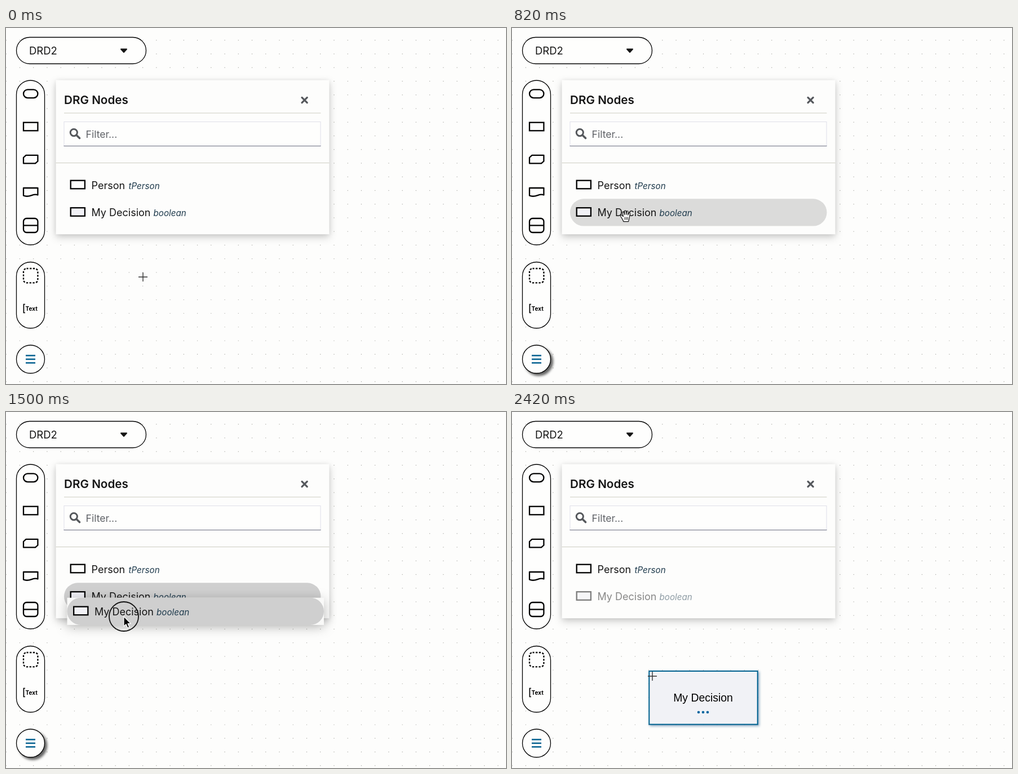
An HTML page for the animation above (2.44 s loop, 887 px wide and 632 px high).

```html
<!DOCTYPE html>
<html lang="en">
<head>
<meta charset="utf-8">
<title>Drag a node onto the diagram</title>
<style>
  html, body { margin: 0; width: 100%; height: 100%; overflow: hidden; background: #fdfdfc; }
  svg { display: block; width: 887px; height: 632px; font-family: Inter, "Open Sans", sans-serif; }
  .pill { fill: #fefefd; stroke: #000; stroke-width: 1.3; }
  .icon { fill: none; stroke: #000; stroke-width: 2.3; stroke-linejoin: round; }
  .label { font-size: 18px; fill: #151515; }
  .type { font-size: 15.2px; font-style: italic; fill: #1f3b4d; }
  .panel { fill: #fdfdfc; filter: drop-shadow(0 5px 7px #0003) drop-shadow(0 0 3px #0001); }
  .rule { stroke: #cdcdc1; stroke-width: 1.2; }
  .lifted { filter: drop-shadow(4px 4px 2px #0009); }
  #ghost { filter: drop-shadow(0 4px 10px #0004); }
  #node rect { fill: #f1f2f6; stroke: #006290; stroke-width: 2; filter: drop-shadow(2px 2px 2px #4a78a0a0); }
  #node text { font: 19.4px "Liberation Sans", Arial, sans-serif; text-anchor: middle; }
</style>
</head>
<body>
<svg viewBox="0 0 887 632">
  <defs>
    <g id="decision">
      <rect class="icon" x="114.7" y="319.2" width="25.2" height="14.6" style="fill:#f1f1f6;stroke-linejoin:miter"/>
      <text class="label" x="151.5" y="334.3">My Decision</text>
      <text class="type" x="261.5" y="334.3">boolean</text>
    </g>
  </defs>

  <path id="grid" stroke="#a8a8a2" stroke-width="1.4" stroke-linecap="round"/>

  <rect class="pill" x="18.5" y="16.5" width="230" height="47" rx="23.5"/>
  <text class="label" x="41" y="46.6" style="font-size:18.5px">DRD2</text>
  <path d="M204 37.5h10l-5 5.5z" stroke="#151515" stroke-width="2" stroke-linejoin="round" fill="#151515"/>

  <rect class="pill" x="18.5" y="93" width="50" height="292" rx="25"/>
  <g class="icon">
    <rect x="31" y="109.3" width="25.4" height="14.8" rx="7.4"/>
    <rect x="31" y="167.7" width="25.4" height="14.6" stroke-linejoin="miter"/>
    <path d="M35.5 225.8H56.4V236.5L52 240.4H31V230z"/>
    <path d="M31 284H56.4V296.5C48 292.5 42 302.5 31 297.5z"/>
    <rect x="31" y="338" width="25.4" height="25" rx="5.5"/>
    <path d="M31 350.5h25.4"/>
  </g>

  <rect class="pill" x="18.5" y="415.5" width="50" height="117.5" rx="25"/>
  <rect class="icon" x="31" y="427" width="25.4" height="25.4" rx="5.5" stroke-dasharray="3.3 2.46" stroke-dashoffset=".23"/>
  <path class="icon" d="M34 490.5h-2.6v15h2.6" style="stroke-width:1.7;stroke-linejoin:miter"/>
  <text x="34.6" y="502" font-size="10" font-weight="700">Text</text>

  <circle id="menu" class="pill" cx="43.5" cy="588" r="25"/>
  <path d="M35 581.4h17M35 588h17M35 594.6h17" stroke="#005f8f" stroke-width="2.5"/>

  <rect class="panel" x="88.5" y="92.5" width="485" height="273.7"/>
  <text x="103" y="135.2" font-size="20.7" font-weight="600" fill="#151515">DRG Nodes</text>
  <path d="M525 123.4l9.2 9.2m0-9.2l-9.2 9.2" stroke="#55585c" stroke-width="3.2" stroke-linecap="round"/>
  <path class="rule" d="M103 151h455.5M88.5 239.5h485"/>
  <rect x="103" y="166.5" width="455" height="43" fill="#fefefd" stroke="#dfdfe9"/>
  <path d="M102.5 209.5h456" stroke="#696c80" stroke-width="1.2"/>
  <g fill="none" stroke="#55585c" stroke-width="3">
    <circle cx="120.3" cy="185.6" r="6.1"/>
    <path d="M125 190.2l5.5 5.3" stroke-width="3.6" stroke-linecap="round"/>
  </g>
  <text x="141.5" y="194.6" font-size="17.6" fill="#606368">Filter...</text>

  <rect class="icon" x="114.7" y="270.7" width="25.2" height="14.6" style="stroke-linejoin:miter"/>
  <text class="label" x="151.5" y="285.8">Person</text>
  <text class="type" x="217.5" y="285.8">tPerson</text>
  <rect id="hover" x="103" y="303.3" width="455.5" height="48.3" rx="24.1"/>
  <use id="row" href="#decision"/>

  <g id="node">
    <rect x="243.3" y="460" width="192.4" height="94.6"/>
    <text x="339" y="513.7">My Decision</text>
    <g fill="#0066a0">
      <circle cx="331" cy="533" r="2.3"/><circle cx="339" cy="533" r="2.3"/><circle cx="347" cy="533" r="2.3"/>
    </g>
  </g>

  <g id="ghost">
    <rect x="103" y="303.3" width="455.5" height="48.3" fill="#f9f9f8"/>
    <rect x="103" y="303.3" width="455.5" height="48.3" rx="24.1" fill="#cfcfcf"/>
    <use href="#decision"/>
  </g>

  <g id="pointer">
    <circle id="ring" fill="none" stroke="#111" stroke-width="1.8"/>
    <path id="cross" d="M-8 0H8M0-8V8" stroke="#333" stroke-width="1.4"/>
    <path id="arrow" d="M0 0V17.5L4 13.8 6.8 20.3 9.7 19 7 12.7H12.3Z" fill="#000" stroke="#fff" stroke-width="1.2" stroke-linejoin="round"/>
    <g id="hand" stroke="#111" stroke-width="1.2" stroke-linejoin="round" stroke-linecap="round">
      <path fill="#fff" d="M-4 10C-5 6-8 3-9 .5-9.5-2-7.5-2.6-6-.5L-4.3 1-6-5.5C-6.3-7.8-4-8-3.4-6L-2.2-2V-8.2C-2.2-10.2.4-10.2.5-8.2L.8-2.2 1.8-7.8C2.2-9.6 4.4-9.2 4.2-7.2L3.8-1.6 5.4-5C6.2-6.6 8.2-5.8 7.6-4 7-1 6.6 4 4.8 10Z"/>
      <path fill="none" d="M-1.6 2.2V6.5M1 2.2V6.5M3.4 2.2V6.5" stroke-width="1"/>
    </g>
  </g>
</svg>
<script>
const LOOP = 2440, STEP = 20;
const PRESS = 1040, DRAG = 1340, RELEASE = 1840, DROP = 2000;
const GRAB = [202.3, 332.2], GHOST_LAG = 22;

// Pointer path: time, x, y
const path = [
  [0, 243, 442], [100, 241, 437], [250, 222, 388], [400, 207, 345], [540, 204, 336],
  [1060, 201, 333], [1300, 201.5, 335], [1500, 209, 363], [1740, 238, 445],
  [1800, 245, 461], [1920, 250, 468], [2020, 249, 469], [LOOP, 249, 469]
];

const el = id => document.getElementById(id);
const show = (id, on) => { el(id).style.display = on ? '' : 'none'; };
const slope = (i, k) => (path[i + 1][k] - path[i][k]) / (path[i + 1][0] - path[i][0]);

// Tangents that never overshoot the way points
function tangent(i, k) {
  if (i === 0 || i === path.length - 1) return 0;
  const a = slope(i - 1, k), b = slope(i, k);
  return a * b > 0 ? 2 * a * b / (a + b) : 0;
}

function pointerAt(time) {
  const t = Math.max(0, time);
  let i = 0;
  while (i < path.length - 2 && t >= path[i + 1][0]) i++;
  const span = path[i + 1][0] - path[i][0], u = (t - path[i][0]) / span, v = 1 - u;
  return [1, 2].map(k =>
    v * v * (1 + 2 * u) * path[i][k] + u * u * (3 - 2 * u) * path[i + 1][k] +
    span * u * v * (v * tangent(i, k) - u * tangent(i + 1, k)));
}

function ringRadius(t) {
  if (t < PRESS || t >= RELEASE + 40) return 0;
  if (t >= RELEASE) return 26 + (t - RELEASE) * 0.4;
  return Math.max(26, 44 - (t - PRESS) * 0.35);
}

function draw(t) {
  const [x, y] = pointerAt(t);
  const dropped = t >= DROP, dragging = t >= DRAG && !dropped;
  const inPanel = !dropped && (t >= DRAG || y < 366);
  const overRow = inPanel && (dragging || y < 351);
  const cursor = !inPanel ? 'cross' : overRow && !dragging ? 'hand' : 'arrow';

  el('pointer').setAttribute('transform', `translate(${x} ${y})`);
  for (const c of ['cross', 'arrow', 'hand']) show(c, c === cursor);
  const r = ringRadius(t);
  show('ring', r > 0);
  el('ring').setAttribute('r', r);

  el('menu').classList.toggle('lifted', inPanel);
  show('hover', overRow);
  el('hover').setAttribute('fill', dragging ? '#cfcfcf' : '#dbdbda');
  el('row').setAttribute('opacity', dropped ? 0.5 : 1);
  show('node', dropped);

  const [gx, gy] = pointerAt(t - GHOST_LAG);
  show('ghost', dragging);
  el('ghost').setAttribute('transform', `translate(${gx - GRAB[0]} ${gy - GRAB[1]})`);
}

let dots = '';
for (let row = 0; row < 26; row++)
  for (let col = 0; col < 37; col++)
    dots += `M${(col * 24.24 + 0.2).toFixed(2)} ${(21.8 + row * 24.24).toFixed(2)}h.01`;
el('grid').setAttribute('d', dots);

let start;
function tick(now) {
  start ??= now;
  draw(Math.floor((now - start) % LOOP / STEP) * STEP);
  requestAnimationFrame(tick);
}
draw(0);
requestAnimationFrame(tick);
</script>
</body>
</html>
```
